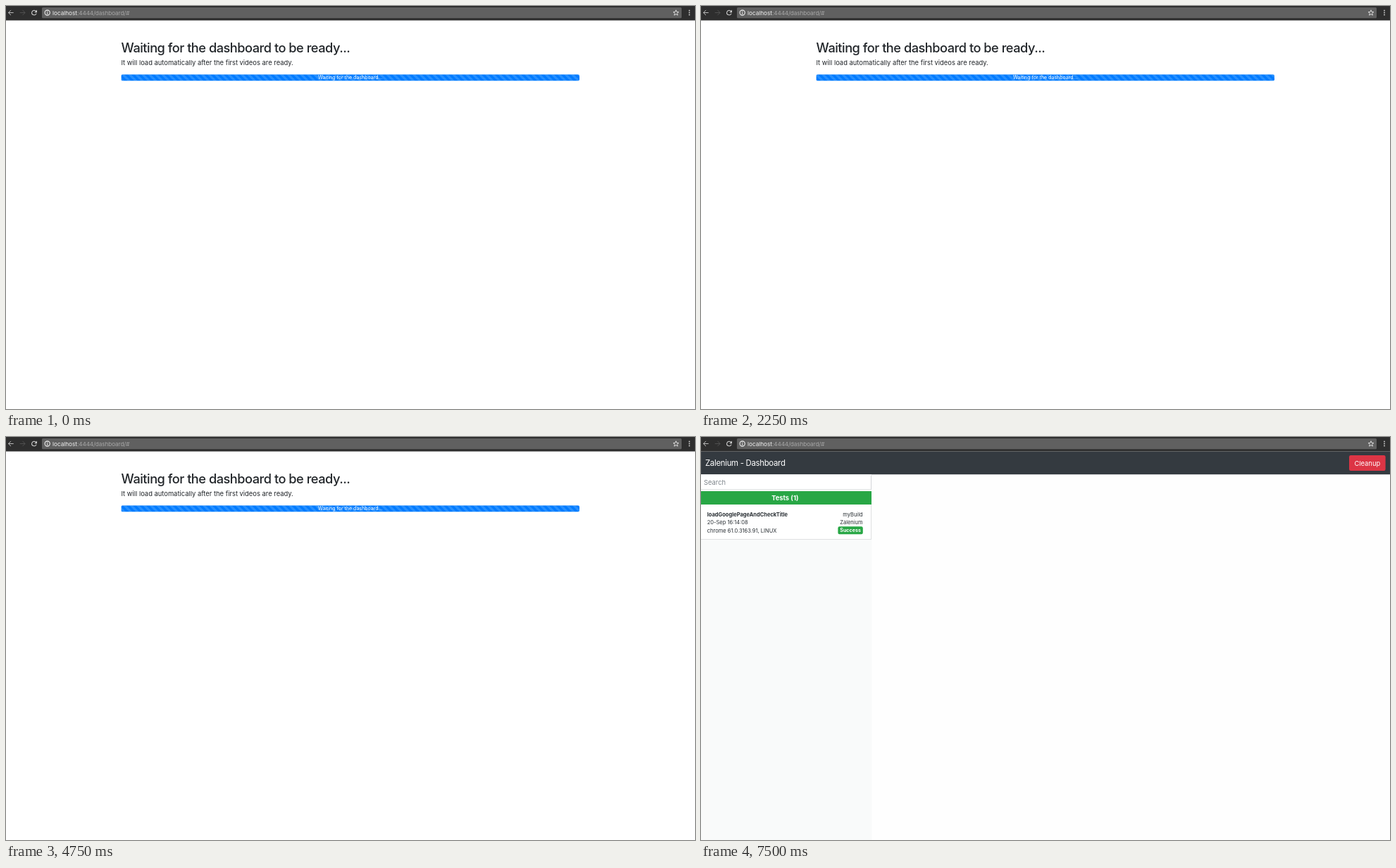
An HTML page with a canvas for the animation above (8 s loop, 978 by 573 pixels).

```html
<!DOCTYPE html>
<html lang="en">
<head>
<meta charset="utf-8">
<title>Dashboard</title>
<style>
  html, body { margin: 0; width: 100%; height: 100%; overflow: hidden; background: #fff; }
  canvas { display: block; }
</style>
</head>
<body>
<canvas id="stage" width="978" height="573"></canvas>
<script>
const ctx = document.getElementById('stage').getContext('2d');
const LOOP = 8000, TICK = 250;
const DASHBOARD_AT = 6750, LOADING_FROM = 6500, LOADING_TO = 7500;
const REM = 9.38;
const SMALL = REM * 0.8;
const GREEN = '#28a745';

function rect(x, y, w, h, color) {
  ctx.fillStyle = color;
  ctx.fillRect(x, y, w, h);
}

function roundRect(x, y, w, h, r, color) {
  ctx.fillStyle = color;
  ctx.beginPath();
  ctx.roundRect(x, y, w, h, r);
  ctx.fill();
}

function text(str, x, y, size, color, { weight = 400, align = 'left', spacing = 0 } = {}) {
  ctx.font = `${weight} ${size}px Inter, sans-serif`;
  ctx.letterSpacing = spacing + 'px';
  ctx.textAlign = align;
  ctx.fillStyle = color;
  ctx.fillText(str, x, y);
}

function line(points, color, width = 1) {
  ctx.strokeStyle = color;
  ctx.lineWidth = width;
  ctx.beginPath();
  points.forEach(([x, y]) => ctx.lineTo(x, y));
  ctx.stroke();
}

function circle(x, y, r, color) {
  ctx.fillStyle = color;
  ctx.beginPath();
  ctx.arc(x, y, r, 0, Math.PI * 2);
  ctx.fill();
}

// dir is -1 for a left arrow, 1 for a right arrow
function arrow(x, y, dir, color) {
  line([[x - dir * 3.7, y], [x + dir * 3.5, y]], color);
  line([[x, y - 3.6], [x + dir * 3.6, y], [x, y + 3.6]], color);
}

function reloadIcon(x, y, color) {
  ctx.strokeStyle = color;
  ctx.lineWidth = 1.1;
  ctx.beginPath();
  ctx.arc(x, y, 3.3, 0.35, Math.PI * 1.75);
  ctx.stroke();
  ctx.fillStyle = color;
  ctx.beginPath();
  ctx.moveTo(x + 4, y - 4);
  ctx.lineTo(x + 4, y - 0.3);
  ctx.lineTo(x + 0.3, y - 0.3);
  ctx.fill();
}

function stopIcon(x, y, color) {
  line([[x - 3.3, y - 3.3], [x + 3.3, y + 3.3]], color, 1.1);
  line([[x - 3.3, y + 3.3], [x + 3.3, y - 3.3]], color, 1.1);
}

function starIcon(x, y, color) {
  ctx.strokeStyle = color;
  ctx.lineWidth = 0.9;
  ctx.beginPath();
  for (let i = 0; i < 10; i++) {
    const r = i % 2 ? 1.8 : 4.1;
    const a = i * Math.PI / 5 - Math.PI / 2;
    ctx.lineTo(x + r * Math.cos(a), y + r * Math.sin(a));
  }
  ctx.closePath();
  ctx.stroke();
}

function browserBar(loading) {
  const light = '#d0d0d0';
  rect(0, 0, 978, 20.5, '#2e2e2e');
  roundRect(51, 2, 908, 15.2, 1.5, '#606060');
  arrow(7, 9.5, -1, '#bcbcbc');
  arrow(23.5, 9.5, 1, '#505050');
  (loading ? stopIcon : reloadIcon)(40, 9.5, light);

  ctx.strokeStyle = '#f0f0f0';
  ctx.lineWidth = 1.1;
  ctx.beginPath();
  ctx.arc(58.7, 9.5, 3.6, 0, Math.PI * 2);
  ctx.stroke();
  rect(58.2, 7.2, 1, 1, '#f0f0f0');
  rect(58.2, 8.9, 1, 2.8, '#f0f0f0');

  text('localhost', 66, 12.6, 8.2, '#f2f2f2');
  text(':4444/dashboard/#', 101, 12.6, 8.2, '#a8a8a8', { spacing: -0.1 });
  starIcon(951, 9.8, '#e4e4e4');
  for (const y of [6.5, 9.5, 12.5]) circle(970, y, 0.9, light);
}

function progressBar(time) {
  const x = 163.4, y = 97.2, w = 650.6, h = REM;
  const shift = REM * (1 - time / 1000 % 1);
  ctx.save();
  ctx.beginPath();
  ctx.roundRect(x, y, w, h, 2.3);
  ctx.clip();
  rect(x, y, w, h, '#007bff');
  ctx.fillStyle = 'rgba(255,255,255,.15)';
  for (let left = x + shift - 3 * REM; left < x + w; left += REM) {
    ctx.beginPath();
    ctx.moveTo(left, y);
    ctx.lineTo(left + REM / 2, y);
    ctx.lineTo(left + REM / 2 + h, y + h);
    ctx.lineTo(left + h, y + h);
    ctx.fill();
  }
  ctx.restore();
  text('Waiting for the dashboard...', x + w / 2, 104.4, REM * 0.75, '#fff', { align: 'center' });
}

function waitingPage(time) {
  text('Waiting for the dashboard to be ready...', 163.6, 65.6, 18.2, '#212529',
    { weight: 500, spacing: -0.48 });
  text('It will load automatically after the first videos are ready.', 163.4, 84.3, REM, '#212529');
  progressBar(time);
}

function testCard() {
  const ink = '#292f34', right = { align: 'right' };
  rect(0, 96, 242, 50, '#fff');
  rect(0, 145, 242, 1, '#dfe1e2');
  rect(241, 96, 1, 50, '#dfe1e2');
  text('loadGooglePageAndCheckTitle', 8.8, 113.2, SMALL, ink, { weight: 700 });
  text('20-Sep 16:14:08', 8.8, 124.3, SMALL, ink);
  text('chrome 61.0.3163.91, LINUX', 8.8, 135.5, SMALL, ink);
  text('myBuild', 229.6, 113.2, SMALL, ink, right);
  text('Zalenium', 229.6, 124.3, SMALL, ink, right);
  roundRect(194.4, 127.2, 35.4, 11, 2.2, GREEN);
  text('Success', 212.1, 135.3, 7.1, '#fff', { weight: 700, align: 'center' });
}

function dashboardPage() {
  rect(0, 20.5, 978, 553, '#fefefe');
  rect(0, 53, 242.5, 520, '#f9fafa');
  rect(0, 20.5, 978, 32.7, '#343a40');
  text('Zalenium - Dashboard', 6, 41, 11.4, '#fff', { spacing: -0.3 });
  roundRect(920, 26, 51.6, 22, 2.3, '#dc3545');
  text('Cleanup', 945.8, 40.5, REM, '#fff', { align: 'center' });

  rect(0, 53.2, 242, 21.8, '#fff');
  rect(0, 74, 242, 1, '#e3e5e6');
  rect(241, 54, 1, 21, '#d5d7d9');
  text('Search', 4, 68, REM, '#7d848a');

  rect(0, 77, 242, 19.2, GREEN);
  text('Tests (1)', 119.3, 89.8, REM, '#fff', { weight: 700, align: 'center' });
  testCard();
}

function draw(now) {
  const time = Math.floor(now % LOOP / TICK) * TICK;
  rect(0, 0, 978, 573, '#fff');
  if (time < DASHBOARD_AT) waitingPage(time);
  else dashboardPage();
  browserBar(time >= LOADING_FROM && time < LOADING_TO);
}

const start = performance.now();
function tick() {
  draw(performance.now() - start);
  requestAnimationFrame(tick);
}
tick();
</script>
</body>
</html>
```
